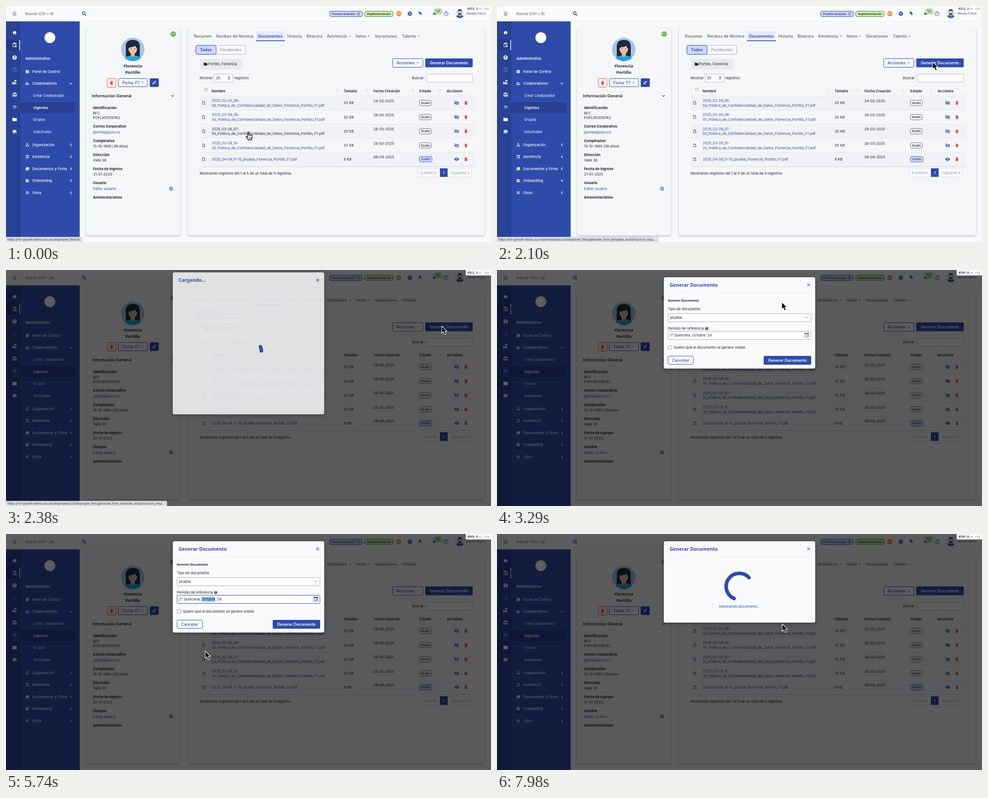
Write an HTML page that moves like this. It is 1073 px wide and 522 px high and loops after 8 s.

```html
<!DOCTYPE html>
<html lang="es">
<head>
<meta charset="utf-8">
<title>Generar Documento</title>
<style>
html,body{margin:0;width:100%;height:100%;overflow:hidden;background:#f7f8fa}
svg{display:block;width:1073px;height:522px}
text{font-family:Inter,sans-serif;white-space:pre}
.noto{font-family:"Noto Sans",sans-serif}
.mono{font-family:"DejaVu Sans Mono",monospace}
.card{filter:drop-shadow(0 2px 2px rgba(40,50,70,.28))}
.pop{filter:drop-shadow(0 2px 4px rgba(0,0,0,.35))}
</style>
</head>
<body>
<svg id="stage" viewBox="0 0 1073 522"></svg>
<script>
const BLUE = '#2f4baa', INK = '#22252b', RED = '#e8503f', GREY = '#9a9fa8';
const S = 7.82, M = 8.94, XS = 6.7;

// y is the vertical middle of the line
const text = (x, y, s, {z = S, c = INK, w = 400, a = 'start', k = '', id = ''} = {}) =>
  `<text ${id && `id="${id}"`} class="${k}" x="${x}" y="${y + z * .36}" font-size="${z}" font-weight="${w}" fill="${c}" text-anchor="${a}">${s}</text>`;
const rect = (x, y, w, h, fill, r = 0, stroke = 'none', sw = 1) =>
  `<rect x="${x}" y="${y}" width="${w}" height="${h}" rx="${r}" fill="${fill}" stroke="${stroke}" stroke-width="${sw}"/>`;
const circle = (x, y, r, fill, stroke = 'none', sw = 1, extra = '') =>
  `<circle cx="${x}" cy="${y}" r="${r}" fill="${fill}" stroke="${stroke}" stroke-width="${sw}" ${extra}/>`;
const line = (d, c, sw = 1) =>
  `<path d="${d}" fill="none" stroke="${c}" stroke-width="${sw}" stroke-linecap="round" stroke-linejoin="round"/>`;
const group = (id, body) => `<g id="${id}">${body}</g>`;

const ICONS = {
  home: 'M10 20v-6h4v6h5v-8h3L12 3 2 12h3v8z',
  trash: 'M6 19a2 2 0 0 0 2 2h8a2 2 0 0 0 2-2V7H6zM19 4h-3.5l-1-1h-5l-1 1H5v2h14z',
  pencil: 'M3 17.2V21h3.8L17.8 9.9l-3.7-3.7zM20.7 7a1 1 0 0 0 0-1.4l-2.3-2.3a1 1 0 0 0-1.4 0l-1.9 1.8 3.8 3.8z',
  eye: 'M12 4.5C7 4.5 2.7 7.6 1 12c1.7 4.4 6 7.5 11 7.5s9.3-3.1 11-7.5c-1.7-4.4-6-7.5-11-7.5zM12 17a5 5 0 1 1 0-10 5 5 0 0 1 0 10zM12 9a3 3 0 1 0 0 6 3 3 0 0 0 0-6z',
  folder: 'M10 4H4a2 2 0 0 0-2 2v12a2 2 0 0 0 2 2h16a2 2 0 0 0 2-2V8a2 2 0 0 0-2-2h-8z',
  school: 'M5 13.2v4L12 21l7-3.8v-4L12 17zM12 3 1 9l11 6 9-4.9V17h2V9z',
  store: 'M20 4H4v2h16zM21 14v-2l-1-5H4l-1 5v2h1v6h10v-6h4v6h2v-6zM12 18H6v-4h6z',
  date: 'M19 3h-1V1h-2v2H8V1H6v2H5a2 2 0 0 0-2 2v14a2 2 0 0 0 2 2h14a2 2 0 0 0 2-2V5a2 2 0 0 0-2-2zM19 19H5V8h14zM12 12h5v5h-5z',
  pin: 'M16 12V4h1V2H7v2h1v8l-2 2v2h5.2v6h1.6v-6H18v-2z',
  horn: 'M2 9v6h4l9 5V4L6 9zM17 8v8a4 4 0 0 0 0-8z',
  clip: 'M19 3h-4a3 3 0 0 0-6 0H5a2 2 0 0 0-2 2v14a2 2 0 0 0 2 2h6v-2H5V5h2v3h10V5h2v5h2V5a2 2 0 0 0-2-2zM17 12a5 5 0 1 0 0 10 5 5 0 0 0 0-10zM16.3 14h1.4v2.6l2 1.2-.7 1.2-2.7-1.6z',
  hand: 'M1 11h4v11H1zM7 11h2l7 3v2h-4 7a3 3 0 0 1 3 2l-8 4-7-2zM16 3a3 3 0 0 1 5 3l-5 5-5-5a3 3 0 0 1 5-3z',
  gift: 'M20 6h-2.2a3 3 0 0 0-5.8-1.5A3 3 0 0 0 6.2 6H4a2 2 0 0 0-2 2v11a2 2 0 0 0 2 2h16a2 2 0 0 0 2-2V8a2 2 0 0 0-2-2zM20 19H4v-2h16zM20 14H4V8h5l-2 3 1.6 1L12 8l3.4 4 1.6-1-2-3h5z',
  chart: 'M5 3a2 2 0 0 0-2 2v14a2 2 0 0 0 2 2h14a2 2 0 0 0 2-2V5a2 2 0 0 0-2-2zM7 10h2v7H7zM11 7h2v10h-2zM15 13h2v4h-2z',
  people: 'M8 11a3.5 3.5 0 1 0 0-7 3.5 3.5 0 0 0 0 7zM16 11a3 3 0 1 0 0-6 3 3 0 0 0 0 6zM1 19v-2c0-3 5-4 7-4s7 1 7 4v2zM17 19v-2c0-2-1-3-2-4 3 0 8 1 8 4v2z',
  tree: 'M9 2h6v6h-2v3h6v5h2v6h-6v-6h2v-3H7v3h2v6H3v-6h2v-5h6V8H9z',
  copy: 'M8 2h9l5 5v11H8zM2 7h4v13h11v2H2z',
  card: 'M3 4h18v16H3zM5 9h6v2H5zM5 13h6v2H5zM14 8h5v6h-5z',
  grid: 'M4 4h4v4H4zM10 4h4v4h-4zM16 4h4v4h-4zM4 10h4v4H4zM10 10h4v4h-4zM16 10h4v4h-4zM4 16h4v4H4zM10 16h4v4h-4zM16 16h4v4h-4z',
  file: 'M5 2h9l6 6v5h-2V9h-5V4H7v16h5v2H5zM14 15h8v2h-8zM14 19h8v2h-8z'
};
const icon = (name, x, y, z, c, rot = 0) =>
  `<path d="${ICONS[name]}" fill="${c}" fill-rule="evenodd" transform="translate(${x} ${y}) rotate(${rot}) scale(${z / 24}) translate(-12 -12)"/>`;
const caret = (x, y, c, r = 2.2) => `<path d="M${x - r} ${y - r / 2}h${2 * r}l${-r} ${r}z" fill="${c}"/>`;
const chevron = (x, y, dir, c, r = 2.4) =>
  line(dir === 'v' ? `M${x - r} ${y - r / 2}l${r} ${r} ${r} ${-r}` : `M${x - dir * r / 2} ${y - r}l${dir * r} ${r} ${-dir * r} ${r}`, c, 1.2);
const cross = (x, y) => line(`M${x - 2.6} ${y - 2.6}l5.2 5.2m0-5.2l-5.2 5.2`, BLUE, 1.3);

function topBar() {
  let o = rect(0, 0, 1073, 34, '#f9fafc') + rect(163, 34, 910, 1, '#e9ebef');
  for (const y of [14, 17, 20]) o += line(`M15.5 ${y}h7`, BLUE, 1.2);
  o += text(43, 17, 'Buscar (Ctrl + B)', {z: 8, c: '#555b66'});
  o += circle(172, 16, 3, 'none', BLUE, 1.4) + line('M174.5 18.5l2.5 2.5', BLUE, 1.6);
  o += rect(716, 11.5, 72.5, 12, '#cfd8f6', 4, BLUE) + text(721, 17.3, 'Prueba Gratuita', {z: XS, w: 700, c: BLUE});
  o += circle(780, 17.5, 2.9, 'none', BLUE, .8) + line('M780 17v2M780 15.8v.1', BLUE, .8);
  o += rect(793.5, 11.5, 63, 12, '#d3efb4', 4, '#3d7d1f') + text(825, 17.3, 'Implementación', {z: XS, w: 700, c: '#234d10', a: 'middle'});
  o += circle(869, 17, 5.5, '#ee8a2a') + text(869, 17, 'MX', {z: 4.5, w: 600, c: '#fff', a: 'middle'});
  o += circle(893.5, 17, 3, 'none', BLUE, 2.4) + circle(893.5, 17, 4.4, 'none', BLUE, 1.4, 'stroke-dasharray="1.7 1.75"');
  o += icon('pin', 917, 16.5, 11, BLUE, -45) + icon('horn', 948, 17, 10, BLUE, 180);
  o += rect(948, 6.5, 16, 11, '#c9ecac', 4, '#5aa33a', .8) + text(956, 12, '121', {z: 6, w: 600, c: '#234d10', a: 'middle'});
  o += circle(973.5, 17, 4.5, 'none', BLUE, 1.1) + text(973.5, 17, '?', {z: 6.5, w: 700, c: BLUE, a: 'middle'});
  o += `<clipPath id="me"><circle cx="1004" cy="17" r="10"/></clipPath><g clip-path="url(#me)">` + circle(1004, 17, 10, '#dcecf8') +
    `<path d="M994 28q1-7 7-8h6q6 1 7 8z" fill="#2d5fae"/><path d="M1002 19h4l-2 5z" fill="#fff"/></g>` +
    circle(1004, 14, 4.2, '#f1c3a0') + `<path d="M999.5 13q-.5-6 4.5-6t4.5 6l-2-2.5h-5zM999.8 14q.5 6 4.2 6t4.2-6l-2 2.5h-4.4z" fill="#25324d"/>`;
  return o + text(1019, 17, 'Renato Fierro', {z: XS, c: BLUE});
}

function sideBar() {
  let o = rect(0, 34, 163, 488, BLUE) + rect(0, 34, 32, 488, '#284297') + rect(0, 74, 30, 24, '#223a88') + rect(29.5, 75, 1.5, 23, '#fff');
  const dim = '#7f92cf', strip = ['home', 'clip', '$', 'clock', 'hand', 'gift', 'school', 'folder', 'store'];
  strip.forEach((n, i) => {
    const y = 59 + i * 27.4;
    if (n === '$') o += circle(19, y, 4.8, '#fff') + text(19, y, '$', {z: 7, w: 700, c: BLUE, a: 'middle'});
    else if (n === 'clock') o += circle(19, y, 4.3, 'none', dim) + line(`M19 ${y - 2.5}v2.5l2 1.5`, dim, .9);
    else o += icon(n, 19, y, 11.5, n === 'school' ? dim : '#fff');
  });
  o += circle(97, 70, 12, '#fff');
  o += text(43, 116, 'Administrativo', {w: 600, c: '#fff'});
  o += rect(32, 213, 121, 24, '#274092', 3);
  [['Crear Colaborador', 198], ['Vigentes', 225], ['Grupos', 251.5], ['Solicitudes', 278]].forEach(([s, y]) =>
    o += text(60, y, s, {c: '#fff', w: s === 'Vigentes' ? 600 : 400}));
  [['Panel de Control', 145, 'chart'], ['Colaboradores', 171.5, 'people'], ['Organización', 307, 'tree'], ['Asistencia', 333.5, 'date'],
   ['Documentos y Firma', 360, 'copy'], ['Onboarding', 386.5, 'card'], ['Otros', 413, 'grid']].forEach(([s, y, n], i) => {
    o += icon(n, 47, y, 9, '#fff') + text(58, y, s, {c: '#fff', w: 450});
    if (i) o += chevron(143.5, y, i === 1 ? 'v' : -1, '#fff');
  });
  return o;
}

function profile() {
  let o = `<g class="card">` + rect(177, 48, 208.5, 459, '#f5f6f8', 5) + '</g>';
  o += circle(370, 62, 6, '#5cb845') + text(370, 62, 'F1', {z: 6, w: 600, c: '#fff', a: 'middle'});
  o += `<clipPath id="face"><circle cx="280.5" cy="96" r="26"/></clipPath><g clip-path="url(#face)">` + circle(280.5, 96, 26, '#a9c4de') +
    `<path d="M265 112V90q0-15 15.5-15t15.5 15v22z" fill="#1d2842"/><path d="M259 124q1-13 14-14h15q13 1 14 14z" fill="#29a3d6"/>
    <path d="M276 102h9v8q-4.5 5-9 0z" fill="#e9ab87"/></g><ellipse cx="280.5" cy="95" rx="9.5" ry="11" fill="#f6c6a5"/>
    <path d="M270 95q0-14 10.5-14t10.5 14q-4-3-5-7-6 4-11 3-3 1-5 4z" fill="#1d2842"/>` +
    circle(276.5, 95, 1, INK) + circle(284.5, 95, 1, INK) + line('M278 100.5q2.5 1.7 5 0', '#c0554d', .9);
  o += text(280.5, 133, 'Florencia', {z: 9, w: 700, a: 'middle', k: 'noto'}) + text(280.5, 146.5, 'Portillo', {z: 9, w: 700, a: 'middle', k: 'noto'});
  o += rect(224, 160.5, 19, 19, '#fdf3f1', 2, RED) + icon('trash', 233.5, 170, 11, RED);
  o += rect(248.5, 160.5, 64.5, 18, '#f8f9fb', 2, BLUE) + text(257.5, 169.5, 'Ficha: F1', {z: M, w: 500, c: BLUE}) + caret(302, 169.5, BLUE);
  o += rect(318, 160, 20, 19, BLUE, 2) + icon('pencil', 328, 169.5, 10, '#fff');
  o += text(190, 199, 'Información General', {z: M, w: 600}) + chevron(368.5, 199, 'v', INK);
  [['Identificación', 225], ['Correo Corporativo', 266.5], ['Cumpleaños', 298], ['Dirección', 329], ['Fecha de Ingreso', 360.5], ['Usuario', 391.5], ['Amonestaciones', 423]]
    .forEach(([s, y]) => o += text(192.5, y, s, {w: 700}));
  [['RFC', 237.5], ['POFL8510157K2', 247.5], ['jportela@zuv.co', 279, BLUE], ['15-10-1985 (39 años)', 310], ['Valle 38', 341.5], ['21-01-2025', 372.5], ['Editar usuario', 404, BLUE]]
    .forEach(([s, y, c]) => o += text(192.5, y, s, {c}));
  return o + circle(365, 404, 3.4, 'none', BLUE, 1.1) + line('M362.8 401.8l4.4 4.4', BLUE, 1.1);
}

function documents() {
  let o = `<g class="card">` + rect(402, 48, 657.5, 459, '#f5f6f8', 5) + '</g>';
  o += rect(553, 56, 64, 21, '#e4eafa') + rect(553, 76, 64, 1.7, BLUE);
  [['Resumen', 415.5], ['Recibos de Nómina', 465], ['Documentos', 557.5], ['Historia', 622], ['Bitácora', 665], ['Asistencia', 710, 761], ['Items', 773.5, 803], ['Vacaciones', 816], ['Talento', 876, 913]]
    .forEach(([s, x, cx], i) => {
      o += text(x, 67, s, {z: M, w: i === 2 ? 600 : 450, c: i === 2 ? BLUE : '#5d626c'});
      if (cx) o += caret(cx, 67, '#5d626c');
    });
  o += rect(420, 87, 110.5, 20, '#f7f8fa', 4, '#a9b0c4') + rect(420, 87, 45, 20, '#cdd7f7', 4, BLUE);
  o += text(429, 97, 'Todos', {z: M, w: 600, c: BLUE}) + text(473.5, 97, 'Pendientes', {z: M, w: 450, c: GREY});
  o += rect(429, 117, 93, 23.5, '#e7e9ed', 2) + icon('folder', 441.5, 128.5, 9.5, INK) + text(447, 128.5, 'Portillo, Florencia');
  o += rect(855.5, 116.5, 67, 19, '#f8f9fb', 2, BLUE) + text(864, 126, 'Acciones', {z: M, w: 500, c: BLUE}) + caret(911, 126, BLUE);
  o += rect(927.5, 116, 105, 19.5, BLUE, 2) + text(980, 126, 'Generar Documento', {z: 8.72, w: 600, c: '#fff', a: 'middle'});
  o += text(428.5, 159, 'Mostrar') + rect(460, 150.5, 42, 18, '#fbfcfd', 2, '#b4bac6') + text(464.5, 159.5, '25') + caret(493.5, 161.5, INK) +
    `<path d="M491.3 158.2h4.4l-2.2-2.4z" fill="${INK}"/>` + text(505, 159, 'registros');
  o += text(926, 159.5, 'Buscar:', {a: 'end'}) + rect(930, 150.5, 102, 18, '#fbfcfd', 2, '#b4bac6');
  o += rect(439.5, 182, 5.5, 5.5, '#fff', 1, '#7c828e', .8);
  [['Nombre', 455], ['Tamaño', 747], ['Fecha Creación', 813], ['Estado', 914.5], ['Acciones', 975]].forEach(([s, x]) => o += text(x, 188, s, {w: 600}));
  for (const x of [732.5, 799, 900, 960]) o += caret(x, 188.5, '#c9cdd5', 2) + `<path d="M${x - 2} 185.5h4l-2-2z" fill="#c9cdd5"/>`;
  const tail = '_Politica_de_Confidencialidad_de_Datos_Florencia_Portillo_F1.pdf';
  const rows = [['2025_02-24_06-', 56, '24-02-2025'], ['2025_03-28_06-', 45, '28-03-2025'], ['2025_03-28_07-', 50, '28-03-2025'], ['2025_03-28_10-', 25, '28-03-2025'], ['2025_04-09_11-15_prueba_Florencia_Portillo_F1.pdf', 0, '09-04-2025']];
  rows.forEach(([s, n, date], i) => {
    const y = i < 4 ? 214.5 + i * 31.3 : 339, last = i === 4;
    o += rect(429, y - 15.5, 609, 31.2, i % 2 ? '#f5f6f8' : '#f0f2f5') + rect(429, y - 16, 609, .7, '#e4e7eb');
    o += icon('file', 437, y, 9.5, '#3c414b');
    const label = last ? text(455, y, s, {c: BLUE}) : text(455, y - 5.3, s, {c: BLUE}) + text(455, y + 5.5, n + tail, {c: BLUE});
    o += i === 2 ? group('link', label) : label;
    o += text(747, y, last ? '8 KB' : '20 KB') + text(813, y - 4.5, date);
    o += rect(914.5, y - 6, last ? 28 : 26.5, 12, last ? '#ced8f7' : '#f8f9fb', 3.5, last ? BLUE : '#50555f', .9) +
      text(last ? 928.5 : 927.8, y, last ? 'Visible' : 'Oculto', {z: 6.2, w: 600, a: 'middle', c: last ? BLUE : INK});
    o += icon('eye', 997, y, 11, BLUE) + icon('trash', 1017.5, y, 10.5, RED);
    if (!last) o += line(`M992.5 ${y - 4}l9 8`, '#f5f6f8', 2.2) + line(`M992.5 ${y - 4.3}l9 8.6`, BLUE, 1.1);
  });
  o += rect(429, 354, 609, 2.5, '#e2e5e9');
  o += text(428.5, 370, 'Mostrando registros del 1 al 5 de un total de 5 registros');
  o += rect(911.5, 359.5, 118, 18, '#f8f9fb', 2, '#e0e3e8') + rect(960, 359, 17, 19, BLUE) + text(968.5, 369, '1', {c: '#fff', w: 600, a: 'middle'});
  return o + chevron(919.5, 369, -1, GREY, 2.2) + text(923.5, 369, 'Anterior', {c: GREY}) + text(984, 369, 'Siguiente', {c: GREY}) + chevron(1023, 369, 1, GREY, 2.2);
}

const title = s => text(382, 33, s, {z: 10.5, w: 700, c: BLUE, k: 'noto'}) + cross(689.5, 33) + rect(369, 50.5, 335, .8, '#e3e6eb');

function form() {
  let o = title('Generar Documento');
  o += text(378, 68, 'Generar Documento', {z: 6.8, w: 700, k: 'noto'}) + text(378, 86, 'Tipo de documento');
  o += rect(378.5, 96.5, 316, 18, '#fff', 2, '#a6abb5') + text(383, 105, 'prueba') + caret(685, 105.5, '#888d96', 2.6);
  o += text(378, 129, 'Período de referencia') + circle(464, 129.3, 3.4, '#4c515b') + text(464, 129.3, '?', {z: 5, w: 700, c: '#fff', a: 'middle'});
  o += `<rect id="field" x="378.5" y="135.5" width="316" height="18" rx="2" fill="#fff"/><rect id="mark" y="139" height="11" fill="#8fc1ea"/>`;
  o += text(383, 144.5, "1° Quincena, Octubre '24", {id: 'period'});
  o += group('dateOff', icon('date', 685.5, 144, 12.5, '#6b707a')) + group('dateOn', icon('date', 685.5, 144, 12.5, BLUE));
  o += rect(378.5, 167.5, 8, 8, '#fff', 1.5, '#8b919c', .9) + text(391, 171.5, 'Quiero que el documento se genere visible');
  o += rect(378.5, 190.5, 56, 18, '#fff', 2, BLUE) + text(406.3, 200, 'Cancelar', {z: M, w: 500, c: BLUE, a: 'middle'});
  return o + rect(590, 190, 105, 19.5, BLUE, 2) + text(642.5, 200, 'Generar Documento', {z: 8.72, w: 600, c: '#fff', a: 'middle'});
}

function days(from, to) {
  const x = c => 398.3 + c * 20.1, y = r => 222 + r * 20.1;
  let o = '';
  for (let r = 0; r < 5; r++) {
    const a = Math.max(from, r * 7), b = Math.min(to, r * 7 + 6);
    if (a > b) continue;
    const l = x(a % 7) - 10, w = (b - a + 1) * 20.1;
    o += rect(l, y(r) - 10, w, 20.3, BLUE, a === from || b === to ? 4 : 0);
    if (a === from && b !== to) o += rect(l + w - 8, y(r) - 10, 8, 20.3, BLUE);
    if (b === to && a !== from) o += rect(l, y(r) - 10, 8, 20.3, BLUE);
  }
  for (let d = 1; d <= 31; d++) {
    const on = d >= from && d <= to;
    o += text(x(d % 7), y(Math.floor(d / 7)), d, {c: on ? '#fff' : INK, w: on ? 600 : 450, a: 'middle'});
  }
  return o;
}

function calendar() {
  let o = `<g class="pop">` + rect(378, 155, 162, 186, '#fdfdfe', 2) + '</g>';
  o += text(391, 174.5, 'Octubre 2024', {z: 9, w: 600}) + caret(459.5, 175, INK, 2.7);
  o += chevron(500, 174.5, -1, '#b7bbc3', 2.7) + chevron(522, 174.5, 1, BLUE, 2.7);
  [...'LMMJVSD'].forEach((s, i) => o += text(398.3 + i * 20.1, 201, s, {z: 7.26, c: '#555a64', a: 'middle'}));
  return o + group('half1', days(1, 15)) + group('half2', days(16, 31)) + text(512, 326.5, 'Borrar', {z: M, w: 600, c: BLUE, a: 'middle'});
}

const arrow = `<path d="M0 0v16l3.7-3.4 2.7 6.3 3-1.3-2.7-6.1h5z" fill="#000" stroke="#fff" stroke-width="1.1" stroke-linejoin="round"/>`;
const pointer = `<path d="M-1 1.5q1-2 2.4 0v6q1.2-1.2 2.3.2 1.3-1 2.4.4 1.4-.9 2.3.8v4.5l-1.4 4.6h-7l-4.6-6.5q.6-2 2.4-.8l1.2 1.2z" fill="#fff" stroke="#000" stroke-width="1.3" stroke-linejoin="round"/>` +
  line('M2.2 12.5v3M4.2 12.5v3M6.2 12.5v3', '#000', .8);

const host = 'https://rm-growth-demo.zuv.mx/';
const status = (id, w, s) => group(id, rect(-1, 511, w, 12, '#dcdfe4', 2, '#b9bdc5', .8) + text(3, 516.5, host + s, {z: XS, c: '#3a3e46'}));

document.getElementById('stage').innerHTML = rect(0, 0, 1073, 522, '#f8f9fb') + topBar() + sideBar() + profile() + documents() +
  group('dim', rect(0, 0, 1073, 522, '#000')) +
  group('modal', `<rect id="sheet" class="pop" x="369" y="16" width="335" rx="4" fill="#f9fafc"/>` +
    group('loading', title('Cargando...')) + group('form', form()) +
    group('working', title('Generar Documento') + text(536.5, 160, 'Generando documento...', {c: BLUE, a: 'middle'})) +
    `<path id="ring" fill="none" stroke="${BLUE}" stroke-width="8" stroke-linecap="round"/>`) +
  group('picker', calendar()) +
  status('url1', 168, 'employee_files/41') + status('url2', 357, 'employees/23/employee_files/generate_from_template_modal?source_requ...') +
  rect(1017, -3, 60, 15, '#fff', 3) + text(1021, 5.7, '', {z: 6.4, w: 700, k: 'mono', id: 'clock'}) +
  text(1047, 6, 'ms', {z: 5.6, c: '#888', k: 'mono'}) + text(1058, 6, '', {z: 5.6, c: '#555', k: 'mono', id: 'count'}) +
  group('cursor', group('arrow', arrow) + group('pointer', pointer));

const el = {};
document.querySelectorAll('[id]').forEach(n => el[n.id] = n);
const set = (id, attrs) => Object.entries(attrs).forEach(([k, v]) => el[id].setAttribute(k, v));
const show = (id, on) => el[id].style.display = on ? '' : 'none';

// time, x, y of the cursor's tip
const PATH = [[0, 536, 278], [70, 536, 278], [840, 611, 257], [1890, 611, 257], [1960, 818, 216], [2100, 964, 124], [2590, 964, 124],
  [3220, 630, 71], [3360, 630, 71], [3780, 684, 143], [4340, 684, 143], [4690, 411, 176], [4900, 411, 176], [5250, 438, 262],
  [5600, 438, 262], [6440, 486, 209], [6650, 486, 209], [7140, 631, 199], [8000, 631, 199]];
const clamp = v => Math.min(1, Math.max(0, v));
const ease = v => v < .5 ? 2 * v * v : 1 - 2 * (1 - v) ** 2;
const within = (t, a, b) => t >= a && t < b;
function tip(t) {
  const i = PATH.findIndex((p, n) => n && t <= p[0]);
  const [t0, x0, y0] = PATH[i - 1], [t1, x1, y1] = PATH[i], k = ease((t - t0) / (t1 - t0));
  return [x0 + (x1 - x0) * k, y0 + (y1 - y0) * k];
}
// an arc that turns while it grows, u ms after it appears
function spin(cy, u, from, grow) {
  const r = 29, a = from + u * .18, span = 253 * ease(clamp(u / grow)) + .1;
  const at = deg => `${536 + r * Math.cos(deg * Math.PI / 180)} ${cy + r * Math.sin(deg * Math.PI / 180)}`;
  set('ring', {d: `M${at(a)}A${r} ${r} 0 ${span > 180 ? 1 : 0} 1 ${at(a + span)}`});
}

function draw(t) {
  const over = t < 330;
  const hand = over || within(t, 3720, 4430) || within(t, 4640, 5600) || within(t, 7010, 7740);
  set('cursor', {transform: `translate(${tip(t)})`});
  show('pointer', hand);
  show('arrow', !hand);
  el.link.querySelectorAll('text').forEach(n => n.setAttribute('fill', over ? '#16245c' : BLUE));
  show('url1', t < 1000);
  show('url2', within(t, 2050, 2700));

  const loading = within(t, 2220, 2800), working = t >= 7740, opened = t - 2220;
  set('dim', {opacity: .63 * clamp(opened / 130)});
  show('modal', opened >= 0);
  set('modal', {opacity: clamp(opened / 190), transform: `translate(0 ${-50 * (1 - clamp(opened / 300)) ** 2})`});
  set('sheet', {height: loading ? 314 : working ? 180 : 202});
  show('loading', loading);
  show('form', within(t, 2800, 7740));
  show('working', working);
  show('ring', loading || working);
  if (loading) spin(191, opened, -50, 850);
  if (working) spin(116, t - 7740, 70, 350);

  const focus = t >= 3850, changed = t >= 5390;
  show('picker', within(t, 3900, 5600));
  show('half1', !changed);
  show('half2', changed);
  show('dateOn', focus);
  show('dateOff', !focus);
  set('field', {stroke: focus ? BLUE : '#a6abb5'});
  el.period.textContent = `${changed ? 2 : 1}° Quincena, Octubre '24`;
  show('mark', changed);
  if (within(t, 5390, 7740)) {
    const x = el.period.getStartPositionOfChar(13).x;
    set('mark', {x, width: el.period.getEndPositionOfChar(19).x - x});
  }
  el.clock.textContent = t < 2800 ? '6311.1' : '6585.0';
  el.count.textContent = t < 2800 ? '+12' : '+13';
}

const start = performance.now();
function tick() {
  draw((performance.now() - start) % 8000);
  requestAnimationFrame(tick);
}
tick();
</script>
</body>
</html>
```
